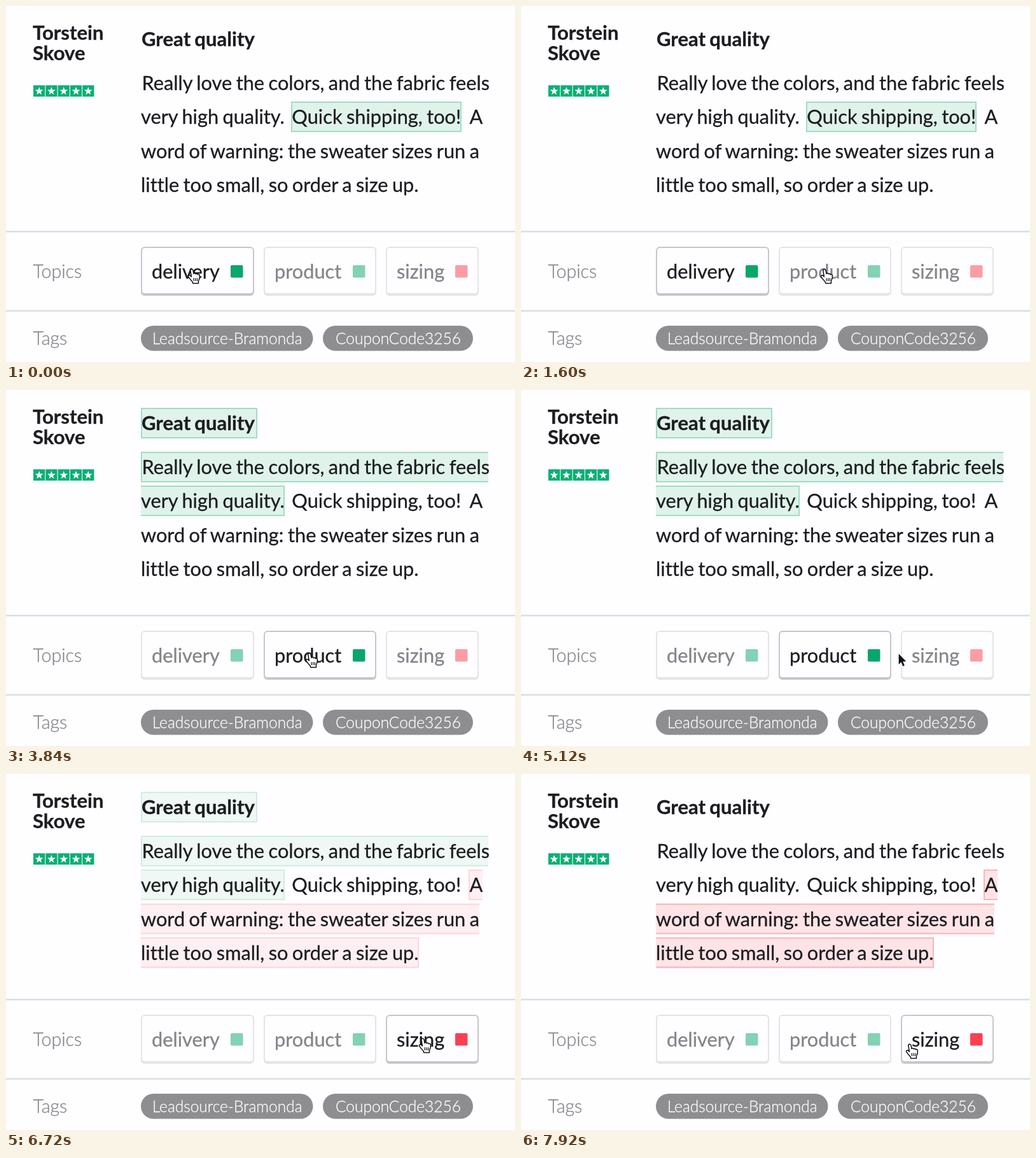
An HTML page for the animation above (8000 ms loop, 800 by 559 pixels).

```html
<!DOCTYPE html>
<html lang="en">
<head>
<meta charset="utf-8">
<title>Review topics</title>
<style>
html, body { margin: 0; width: 100%; height: 100%; overflow: hidden; background: #fefdff; }
svg { display: block; width: 800px; height: 559px; }
text {
  font: 30.75px Lato, sans-serif; font-variant-ligatures: none; word-spacing: -1.45px;
  color: #1d1d20; fill: currentColor; stroke: currentColor; stroke-width: .3px;
}
.bold { font-weight: 700; font-size: 31.1px; }
.label { font-weight: 300; font-size: 28.6px; color: #858589; }
.tag { font-weight: 300; font-size: 24.5px; color: #fff; text-anchor: middle; }
</style>
</head>
<body>
<svg id="stage" viewBox="0 0 800 559" xmlns="http://www.w3.org/2000/svg"></svg>
<script>
const LOOP = 8000;
const GREEN = '#0aa66c', RED = '#fb4052';
const stage = document.getElementById('stage');

const text = (x, y, s, cls = '') => `<text x="${x}" y="${y}" class="${cls}">${s}</text>`;
const rect = (x, y, w, h, fill, r = 0) =>
  `<rect x="${x}" y="${y}" width="${w}" height="${h}" rx="${r}" fill="${fill}"/>`;

// A highlighted line; sides lists which vertical edges are closed.
function mark(x, y, right, sides, fill, edge) {
  const w = right - x, h = 48;
  let out = rect(x, y, w, h, fill) + rect(x, y, w, 2, edge) + rect(x, y + h - 2, w, 2, edge);
  if (sides.includes('l')) out += rect(x, y, 2, h, edge);
  if (sides.includes('r')) out += rect(right - 2, y, 2, h, edge);
  return out;
}
const good = (x, y, right, sides) => mark(x, y, right, sides, '#dff3ea', '#a1ddc4');
const bad = (x, y, right, sides) => mark(x, y, right, sides, '#ffe4e7', '#fab5bb');

function star(cx, cy, r) {
  const pts = [];
  for (let i = 0; i < 10; i++) {
    const a = i * Math.PI / 5, d = i % 2 ? r * 0.4 : r;
    pts.push((cx + d * Math.sin(a)).toFixed(2) + ',' + (cy - d * Math.cos(a)).toFixed(2));
  }
  return `<polygon points="${pts.join(' ')}" fill="#fff"/>`;
}
function stars() {
  let out = '';
  for (let i = 0; i < 5; i++) {
    const x = 43 + i * 19.3;
    out += rect(x, 124.5, 18.2, 17.8, '#05b073') + star(x + 9.1, 133.8, 6.8);
  }
  return out;
}

const topics = [
  { name: 'delivery', x: 212, right: 390, color: GREEN, pale: '#83d2b5' },
  { name: 'product', x: 405, right: 582, color: GREEN, pale: '#83d2b5' },
  { name: 'sizing', x: 597, right: 743, color: RED, pale: '#fd9ca4' }
];
function button({ name, x, right }) {
  const w = right - x;
  return `<g class="topic">${rect(x, 378, w, 77, '', 6)}${rect(x + 2, 380, w - 4, 71, '#fefdff', 4)}
    ${text(x + 17, 427.5, name)}${rect(right - 37, 407, 19.5, 19.5, '', 2)}</g>`;
}
const pill = (x, right, s) =>
  rect(x, 502, right - x, 39.5, '#8e8d90', 19.75) + text((x + right) / 2 + 0.5, 531, s, 'tag');

stage.innerHTML = `
  <g class="mark">${good(448, 150, 716, 'lr')}</g>
  <g class="mark">${good(212, 28, 395, 'lr')}${good(212, 97, 758, 'l')}${good(212, 150, 438, 'r')}</g>
  <g class="mark">${bad(727, 150, 749, 'l')}${bad(212, 203.5, 744, '')}${bad(212, 256.5, 649, 'r')}</g>
  ${text(42, 53, 'Torstein', 'bold')}${text(42, 85, 'Skove', 'bold')}
  ${stars()}
  ${text(213, 63, 'Great quality', 'bold')}
  ${text(213.5, 132, 'Really love the colors, and the fabric feels')}
  ${text(212, 185, 'very high quality.')}
  ${text(449.3, 185, 'Quick shipping, too!')}
  ${text(728.5, 185, 'A')}
  ${text(212, 238.5, 'word of warning: the sweater sizes run a')}
  ${text(212, 292, 'little too small, so order a size up.')}
  ${rect(0, 353, 800, 2.4, '#d8dee1')}${rect(0, 477.5, 800, 2.4, '#d8dee1')}
  ${text(42.5, 427, 'Topics', 'label')}${text(42.5, 532, 'Tags', 'label')}
  ${topics.map(button).join('')}
  ${pill(212, 482.5, 'Leadsource-Bramonda')}${pill(498, 734, 'CouponCode3256')}
  <g id="cursor">
    <g id="hand" stroke="#111" stroke-width="1.5" stroke-linejoin="round" stroke-linecap="round">
      <path fill="#fff" d="M-2.2 2.6C-2.4-.4 1.5-.6 2 2.2L3 7.4C3.5 6 6 6.2 6.3 8C7 6.7 9 7 9.4 8.8C10.4 7.8 12.2 8.4 12.4 10.4C12.7 14 12 16 10.6 18.5L10.4 22.4H1.8L1 20C-1 18-3 15.5-5 12.6C-6.6 10.2-4 8.8-2 10.6L-.6 12Z"/>
      <path fill="none" d="M3 14.5l.4 4M5.8 14.5l.2 4M8.5 14.5v4" stroke-width="1.2"/>
    </g>
    <path id="arrow" d="M0 0V16.6L3.8 13L6.5 19.4L9.2 18.2L6.5 12H11.6Z" fill="#111"
      stroke="#fff" stroke-width="2.2" paint-order="stroke"/>
  </g>`;

const marks = stage.querySelectorAll('.mark');
const buttons = [...stage.querySelectorAll('.topic')].map(g => ({
  box: g.querySelector('rect'), label: g.querySelector('text'), chip: g.lastElementChild
}));
const cursor = document.getElementById('cursor');
const hand = document.getElementById('hand');
const arrow = document.getElementById('arrow');

const ramp = (t, a, b) => Math.min(1, Math.max(0, (t - a) / (b - a)));
const glide = p => Math.sin(p * Math.PI / 2);

function draw(t) {
  const toProduct = ramp(t, 1800, 2820);
  const toSizing = ramp(t, 6190, 7200);
  [1 - toProduct, toProduct * (1 - toSizing), toSizing]
    .forEach((o, i) => marks[i].setAttribute('opacity', o.toFixed(3)));

  const active = t < 1820 ? 0 : t < 6200 ? 1 : 2;
  buttons.forEach(({ box, label, chip }, i) => {
    const on = i === active;
    box.setAttribute('fill', on ? '#c7c7cb' : '#e4e4e8');
    label.style.color = on ? '#1d1d20' : '#858588';
    chip.setAttribute('fill', on ? topics[i].color : topics[i].pale);
  });

  const first = glide(ramp(t, 80, 1600));
  const second = glide(ramp(t, 4320, 6080));
  const leave = ramp(t, 7200, 7920) ** 2;
  const x = 292 + 185 * first + 178 * second - 44 * leave;
  const y = 413 + 2 * second + 9 * leave;
  const over = topics.some(b => x >= b.x && x <= b.right);
  cursor.setAttribute('transform', `translate(${x.toFixed(2)} ${y.toFixed(2)})`);
  hand.style.display = over ? '' : 'none';
  arrow.style.display = over ? 'none' : '';
}

function tick() {
  draw(performance.now() % LOOP);
  requestAnimationFrame(tick);
}
tick();
</script>
</body>
</html>
```
